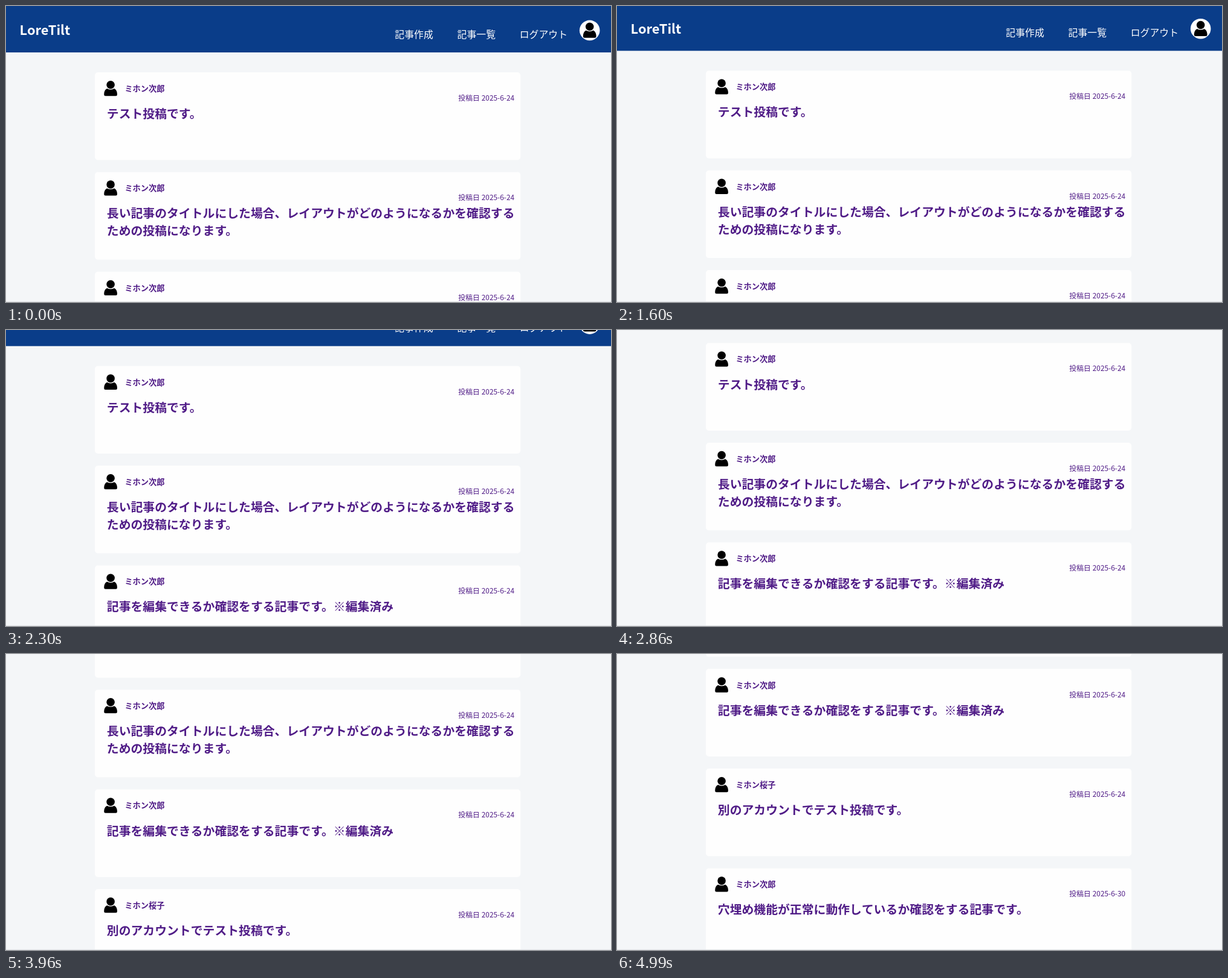
Animation, 1001 px wide and 491 px high, one loop 6.92 s. Source, as an HTML page with a canvas:

```html
<!DOCTYPE html>
<html lang="ja">
<head>
<meta charset="utf-8">
<title>記事一覧</title>
<style>
  html, body { margin: 0; width: 100%; height: 100%; overflow: hidden; background: #f4f6f8; }
  canvas { display: block; }
</style>
</head>
<body>
<canvas id="stage" width="1001" height="491"></canvas>
<script>
const ctx = document.getElementById('stage').getContext('2d');
const LOOP = 6920;
const PURPLE = '#501c87';
const CARD = { x: 147, top: 110, width: 704.3, height: 145.4, pitch: 165.4 };

const posts = [
  { name: 'ミホン次郎', date: '2025-6-24', title: ['テスト投稿です。'] },
  { name: 'ミホン次郎', date: '2025-6-24', title: [
    '長い記事のタイトルにした場合、レイアウトがどのようになるかを確認する',
    'ための投稿になります。'] },
  { name: 'ミホン次郎', date: '2025-6-24', title: ['記事を編集できるか確認をする記事です。※編集済み'] },
  { name: 'ミホン桜子', date: '2025-6-24', title: ['別のアカウントでテスト投稿です。'] },
  { name: 'ミホン次郎', date: '2025-6-30', title: ['穴埋め機能が正常に動作しているか確認をする記事です。'] },
];

// Each scroll gesture moves in discrete steps, the first at start, the last at end.
const gestures = [
  { start: 1600, end: 1880, steps: 5, to: 13.4, power: 1 },
  { start: 2020, end: 2510, steps: 8, to: 81.4, power: 1.3 },
  { start: 2860, end: 3350, steps: 8, to: 186.7, power: 1.3 },
  { start: 3760, end: 4170, steps: 7, to: 275.6, power: 1.3 },
  { start: 4500, end: 4990, steps: 8, to: 416.2, power: 1.3 },
];

function scrollAt(time) {
  let y = 0;
  for (const { start, end, steps, to, power } of gestures) {
    if (time < start) break;
    const interval = (end - start) / (steps - 1);
    const step = Math.min(steps, Math.floor((time - start) / interval + 0.001) + 1);
    y += (to - y) * (step / steps) ** power;
  }
  return y;
}

function text(string, x, y, size, color, weight = 400, align = 'left') {
  ctx.font = `${weight} ${size}px "Noto Sans CJK JP", "Noto Sans CJK", sans-serif`;
  ctx.textAlign = align;
  ctx.fillStyle = color;
  ctx.fillText(string, x, y);
}

function circle(x, y, radius, color) {
  ctx.fillStyle = color;
  ctx.beginPath();
  ctx.arc(x, y, radius, 0, 2 * Math.PI);
  ctx.fill();
}

const shoulders = new Path2D('M-6 6.4 Q0 9.6 6 6.4 C9.4 8 10.9 11.5 10.9 16 ' +
  'Q10.9 18.5 8.6 18.5 H-8.6 Q-10.9 18.5 -10.9 16 C-10.9 11.5 -9.4 8 -6 6.4Z');

function person(x, y) {
  ctx.save();
  ctx.translate(x, y);
  circle(0, 0, 6.8, '#000');
  ctx.fill(shoulders);
  ctx.restore();
}

function drawHeader() {
  ctx.fillStyle = '#0a3d89';
  ctx.fillRect(0, 0, 1001, 77);
  text('LoreTilt', 22.6, 48.2, 21.83, '#fff', 700);
  ['記事作成', '記事一覧', 'ログアウト'].forEach((label, i) =>
    text(label, 643.3 + i * 103.2, 52.6, 15.88, '#fff'));
  circle(965.7, 40.4, 16.8, '#fff');
  person(965.7, 34.2);
}

function drawCard({ name, date, title }, index) {
  const top = CARD.top + index * CARD.pitch;
  ctx.fillStyle = '#fefefe';
  ctx.beginPath();
  ctx.roundRect(CARD.x, top, CARD.width, CARD.height, 5);
  ctx.fill();
  person(173.1, top + 20.7);
  text(name, 196.4, top + 31.9, 13.23, PURPLE, 700);
  text('投稿日 ' + date, 841.2, top + 46.9, 11.91, PURPLE, 400, 'right');
  title.forEach((line, i) =>
    text(line, 166.8, top + 76 + i * 28.9, 19.85, PURPLE, 700));
}

function draw() {
  ctx.fillStyle = '#f4f6f8';
  ctx.fillRect(0, 0, 1001, 491);
  ctx.save();
  ctx.translate(0, -scrollAt(performance.now() % LOOP));
  drawHeader();
  posts.forEach(drawCard);
  ctx.restore();
  ctx.fillStyle = '#e2e4e7';
  ctx.fillRect(0, 490, 1001, 1);
  requestAnimationFrame(draw);
}
draw();
</script>
</body>
</html>
```
